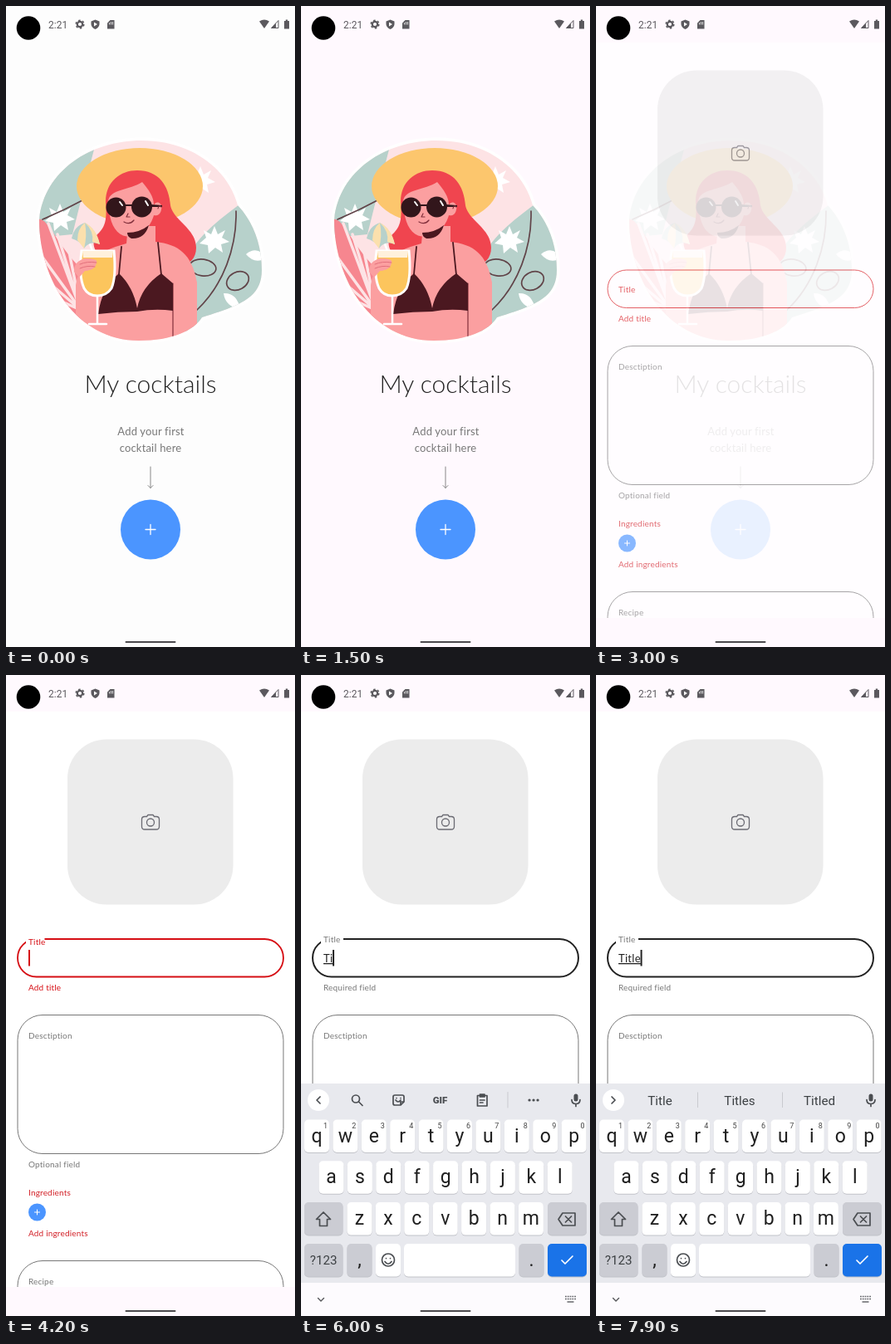
An HTML page for the animation above (8 s loop, 348x772 px).

```html
<!DOCTYPE html>
<html lang="en">
<head>
<meta charset="utf-8">
<title>My cocktails</title>
<style>
  html, body { margin: 0; width: 100%; height: 100%; overflow: hidden; background: #fff9fe; }
  svg { display: block; width: 100vw; height: 100vh; }
  text { font: 10px Lato, sans-serif; letter-spacing: .18px; fill: #777; }
  .mid { text-anchor: middle; }
  .line { fill: none; stroke-linecap: round; stroke-linejoin: round; }
  .err { fill: #d21f26; }
  .box { fill: none; stroke: #777; }
  .hint { font-size: 13px; }
  #head { font-size: 30px; font-weight: 300; letter-spacing: 0; fill: #222; }
  #typed { font-size: 13px; letter-spacing: .3px; fill: #222; text-decoration: underline; }
  #kb text { font-family: Roboto, sans-serif; letter-spacing: 0; text-anchor: middle; fill: #1f1f1f; }
  #kb .key { font-size: 23px; }
  #kb .num { font-size: 9px; fill: #444; }
  #kb .word { font-size: 15.2px; fill: #3c4043; }
</style>
</head>
<body>
<svg viewBox="0 0 348 772" preserveAspectRatio="none">
  <defs>
    <path id="blob" d="M40 258C45 200 100 162 163 162C222 162 267 195 279 240C296 258 308 285 308 318C308 350 285 360 236 375C226 391 200 403 160 403C85 403 40 330 40 258Z"/>
    <clipPath id="inBlob"><use href="#blob"/></clipPath>
    <clipPath id="inForm"><path d="M0 44H348V737H0Z"/></clipPath>
    <path id="flower" d="M0-17L4-7L13-12L9-3L18 2L8 5L10 15L1 9L-7 16L-8 6L-18 4L-10-3L-13-12L-4-7Z" fill="#fff"/>
  </defs>
  <rect id="bg" width="348" height="772"/>

  <g id="home">
    <use href="#blob" fill="#fff" stroke="#fff" stroke-width="7"/>
    <g clip-path="url(#inBlob)">
      <path d="M30 150H320V410H30Z" fill="#fde3e5"/>
      <path d="M30 280V150H112L95 215L80 275ZM222 296C240 268 262 254 285 236L320 270V400H215Z" fill="#b7d1cb"/>
      <path d="M36 258C50 250 58 285 92 318V385H36Z" fill="#f6868f"/>
      <path class="line" stroke="#fde3e5" stroke-width="3.5" d="M90 366L51 262M90 366L62 275M90 366L76 296M90 366L42 300M90 366L48 330M90 366L58 352"/>
      <use href="#flower" x="65" y="255"/>
      <use href="#flower" x="251" y="282"/>
      <use href="#flower" x="234" y="210"/>
      <path d="M289 299Q302 288 314 303Q300 312 289 299ZM262 346Q278 345 282 365Q264 362 262 346Z" fill="#fff"/>
      <g class="line" stroke="#614449" stroke-width="1.7">
        <path d="M277 247C278 290 262 336 230 366M44 257Q70 246 94 233"/>
        <ellipse cx="237" cy="315" rx="16" ry="10" transform="rotate(8 237 315)"/>
        <ellipse cx="279" cy="331" rx="14" ry="10.5" transform="rotate(-28 279 331)"/>
      </g>
      <ellipse cx="161" cy="217" rx="76" ry="46" fill="#fcc66d"/>
      <path d="M120 236C120 211 138 198 158 198C184 198 196 216 198 240C201 258 229 268 229 291C229 305 220 313 206 312H130C112 306 98 288 110 275C119 267 122 258 120 236Z" fill="#f0454f"/>
      <path d="M84 410V336C88 312 108 296 145 286L147 265H180V284C208 287 224 299 230 333V410Z" fill="#fb9fa0"/>
      <path d="M123 235C125 220 149 222 164 212C172 222 178 229 178 240C181 233 189 237 187 245C186 252 181 253 178 252C174 267 162 277 150 278C132 278 124 262 123 235Z" fill="#fb9fa0"/>
      <path d="M146 273Q161 273 172 264Q167 281 151 280Q146 278 146 273Z" fill="#4b171f"/>
      <g fill="#32161b">
        <circle cx="132.500" cy="242.500" r="12"/><circle cx="163.500" cy="242" r="12.500"/>
        <path d="M144 239H152V241H144ZM174 239L188 240V242H174Z"/>
      </g>
      <path class="line" stroke="#fff" stroke-width="2" d="M137 236L140 240M168 235L171 240"/>
      <path class="line" stroke="#812f3b" stroke-width="1.200" d="M147 250L145 254H149M142 260Q149 264 154 258M201 334V398M183 244Q184 239 187 242"/>
      <path class="line" stroke="#4b1820" stroke-width="1.800" d="M183 285L187 324M139 290L136 323"/>
      <path d="M111 371Q115 340 136 322Q153 338 158 364Q163 338 187 322L201 334V367Q179 364 158 368Q135 368 111 371Z" fill="#4b1820"/>
      <path class="line" stroke="#fff" stroke-width="2.500" d="M110 347V382M100 383H121M105 298L96 272"/>
      <path d="M79 280Q82 265 95 261Q108 268 113 287Q101 282 94 292Q90 283 79 280Z" fill="#b7d1cb"/>
      <path d="M95 261Q86 268 86 282L94 292Q98 277 95 261ZM95 261Q106 271 104 284L113 287Q109 268 95 261Z" fill="#fbe0ad"/>
      <path d="M91 295H130Q133 326 127 340Q121 349 110 349Q99 349 94 340Q87 324 91 295Z" fill="#fcc55d" stroke="#fff" stroke-width="3"/>
      <path d="M92 295H129L128 303H93Z" fill="#fff1dc"/>
      <path d="M82 320Q82 307 95 304Q111 304 109 309Q108 318 95 319L88 327Z" fill="#fb9fa0"/>
      <path class="line" stroke="#e2717c" d="M89 311Q98 307 109 309M89 316Q98 312 107 314"/>
    </g>
    <text id="head" class="mid" x="174" y="466">My cocktails</text>
    <text class="mid hint" x="174.500" y="517">Add your first</text>
    <text class="mid hint" x="174" y="537">cocktail here</text>
    <path class="line" stroke="#888" d="M174 555V580.500M171 577.500L174 580.500L177 577.500"/>
    <circle cx="174" cy="630.500" r="36" fill="#4b95ff"/>
    <path class="line" stroke="#fff" stroke-width="1.300" d="M168 630.500H180M174 624.500V636.500"/>
  </g>

  <g id="form" clip-path="url(#inForm)">
    <path d="M0 44H348V737H0Z" fill="#fff"/>
    <rect x="74" y="77.500" width="199.500" height="199" rx="47" fill="#ececec"/>
    <g class="line" stroke="#6b6b73" stroke-width="1.300">
      <path d="M167 170.500H169.500L171 168.500H177L178.500 170.500H181Q184.500 170.500 184.500 174V182.500Q184.500 186 181 186H167Q163.500 186 163.500 182.500V174Q163.500 170.500 167 170.500Z"/>
      <circle cx="174" cy="177.500" r="4.500"/>
    </g>
    <rect id="field" x="14" y="318" width="320" height="45.500" rx="22.700" fill="none"/>
    <rect id="notch" x="24" y="315" height="10" fill="#fff"/>
    <text id="label" x="27">Title</text>
    <text id="typed" x="27" y="346"></text>
    <rect id="caret" y="331" width="2" height="19.500"/>
    <text id="help" x="27" y="379.500"></text>
    <rect class="box" x="14" y="409.500" width="320" height="167" rx="30"/>
    <text x="27" y="437.500">Desctiption</text>
    <text x="27" y="592.500">Optional field</text>
    <text class="err" x="27" y="627">Ingredients</text>
    <circle cx="37.500" cy="647" r="10.500" fill="#4b95ff"/>
    <path class="line" stroke="#fff" d="M34.500 647H40.500M37.500 644V650"/>
    <text class="err" x="27" y="675.500">Add ingredients</text>
    <rect class="box" x="14" y="705.500" width="320" height="167" rx="30"/>
    <text x="27" y="733.500">Recipe</text>
  </g>

  <g id="kb">
    <path d="M0 492H348V733H0Z" fill="#e8e9ee"/>
    <path d="M0 732H348V772H0Z" fill="#fdfbfe"/>
    <g id="keys"></g>
    <circle cx="21" cy="512" r="13" fill="#fff"/>
    <g class="line" stroke="#4a4d51" stroke-width="1.700">
      <path id="arrow"/>
      <g id="tools">
        <circle cx="66" cy="510.500" r="4.500"/><path d="M69.500 514L74 518.500"/>
        <path d="M113 506H122Q124 506 124 508V514L120 518H113Q111 518 111 516V508Q111 506 113 506ZM124 514H120V518M114 512Q117 516 120 512M115 509.500V509.600M120 509.500V509.600"/>
        <path d="M212.500 506.500H224V519H212.500ZM215.500 505H221V508H215.500ZM215.500 512H221M215.500 515H219"/>
        <path d="M249 502.500V521" stroke="#c9cacf" stroke-width="1"/>
        <path d="M275 512H275.100M280 512H280.100M285 512H285.100" stroke-width="3.200"/>
        <text x="167.500" y="516" style="font-size:11.500px;font-weight:900;fill:#4a4d51" stroke="none">GIF</text>
      </g>
      <path d="M331 507V511" stroke-width="5"/><path d="M326 511.500Q326 516.500 331 516.500Q336 516.500 336 511.500M331 517V519.500"/>
      <path d="M27 647L18.500 655.500H22.500V663.500H31.500V655.500H35.500Z"/>
      <path d="M315 648H330V663H315L310 655.500ZM318.500 652L325.500 659M325.500 652L318.500 659"/>
      <circle cx="105" cy="704.500" r="7.500"/><path d="M101 706.500Q105 712 109 706.500M102.500 702.500V702.600M107.500 702.500V702.600"/>
      <path d="M314 705L318 709L327 700" stroke="#fff"/>
    </g>
    <g id="words">
      <text class="word" x="77" y="517.500">Title</text>
      <text class="word" x="173" y="517.500">Titles</text>
      <text class="word" x="269" y="517.500">Titled</text>
      <path d="M122.500 502.500V521M224.500 502.500V521" stroke="#c9cacf"/>
    </g>
  </g>

  <g id="nav">
    <path class="line" stroke="#55565a" stroke-width="1.400" d="M20.500 750.500L24 754L27.500 750.500"/>
    <path d="M318 748.500H331M318 751.500H331" stroke="#66676b" stroke-width="1.600" stroke-dasharray="1.800 1"/>
    <path d="M320.500 755H328.500" stroke="#66676b" stroke-width="1.500"/>
  </g>
  <path class="line" stroke="#4b494d" stroke-width="2" d="M144.500 766H203.500"/>

  <g fill="#5b595e">
    <circle cx="27" cy="26.500" r="14.300" fill="#000"/>
    <text x="51" y="26.500" style="font:12px Roboto,sans-serif;letter-spacing:0;fill:#5b595e">2:21</text>
    <circle cx="89" cy="22" r="3.200" fill="none" stroke="#5b595e" stroke-width="2.200"/>
    <circle cx="89" cy="22" r="4.800" fill="none" stroke="#5b595e" stroke-width="1.500" stroke-dasharray="2.500 2.527"/>
    <path d="M107.500 16.500L112.500 18.500V22Q112 26 107.500 28Q103 26 102.500 22V18.500Z"/>
    <path d="M106 19.500V24.500L110 22Z" fill="#fff"/>
    <path d="M125.500 17H130.500V27.500H122V20.500Z"/>
    <path d="M124.500 20V22.500M126.500 19V22.500M128.500 19V22.500" stroke="#fff" stroke-width=".8"/>
    <path d="M305 18.500Q311 14.500 317 18.500L311 27Z"/>
    <path d="M319.500 26.500L328 17.500V26.500Z" fill="none" stroke="#5b595e"/><path d="M319.500 26.500L325 20.500V26.500Z"/>
    <path d="M335 18H336.800V16.500H339.200V18H341V27.500H335Z"/>
  </g>
</svg>
<script>
const LOOP = 8000;
const RED = [214, 14, 20], DARK = [34, 34, 34], GREY = [119, 119, 119];
const $ = id => document.getElementById(id);
const set = (id, attrs) => { for (const k in attrs) $(id).setAttribute(k, attrs[k]); };
const show = (id, on) => set(id, { visibility: on ? 'visible' : 'hidden' });
const ramp = (t, start, length) => Math.min(1, Math.max(0, (t - start) / length));
const ease = p => p * p * (3 - 2 * p);
const mix = (a, b, p) => `rgb(${a.map((v, i) => Math.round(v + (b[i] - v) * p))})`;

function key(x, y, w, label = '', fill = '#fff', cls = 'key') {
  return `<rect x="${x}" y="${y + 1}" width="${w}" height="39.5" rx="5" fill="#c2c3c9"/>` +
    `<rect x="${x}" y="${y}" width="${w}" height="39.5" rx="5" fill="${fill}"/>` +
    `<text class="${cls}" x="${x + w / 2}" y="${y + (cls === 'key' ? 27 : 25)}">${label}</text>`;
}

function buildKeys() {
  const pitch = 34.4, side = '#cbccd3';
  let out = '';
  [['qwertyuiop', 4], ['asdfghjkl', 21.5], ['zxcvbnm', 55.5]].forEach(([row, left], r) => {
    [...row].forEach((ch, i) => {
      const x = left + i * pitch;
      out += key(x, 535.5 + r * 49.8, 30, ch);
      if (!r) out += `<text class="num" x="${x + 25.5}" y="546">${(i + 1) % 10}</text>`;
    });
  });
  out += key(4, 635, 46.5, '', side) + key(297, 635, 47, '', side);
  out += key(4, 685, 46.5, '?123', side, 'word') + key(55.5, 685, 30, ',', side);
  out += key(90, 685, 30) + key(124, 685, 134) + key(262.5, 685, 30, '.', side);
  out += key(297, 685, 47, '', '#1a73e8');
  $('keys').innerHTML = out;
}

const strokes = [5700, 5900, 6300, 6400, 6500];

function draw(t) {
  set('bg', { fill: mix([253, 253, 253], [255, 249, 254], ramp(t, 0, 1000)) });

  const swap = ease(ramp(t, 2640, 600));
  set('home', { opacity: 1 - swap });
  set('form', { opacity: swap });

  // Title field: focus, then error clears on the first letter
  const focus = ease(ramp(t, 4090, 150));
  const valid = ramp(t, 5700, 150);
  const count = strokes.filter(s => t >= s).length;
  set('field', { stroke: mix(RED, DARK, valid), 'stroke-width': 1 + focus });
  set('notch', { width: 27 * focus });
  set('label', { y: 344.5 - 23 * focus, fill: mix(RED, GREY, valid) });
  $('label').style.fill = mix(RED, GREY, valid);
  $('help').textContent = count ? 'Required field' : 'Add title';
  $('help').style.fill = mix(RED, GREY, valid);

  $('typed').textContent = 'Title'.slice(0, count);
  $('typed').style.textDecoration = count < 5 || t >= 6700 ? 'underline' : 'none';
  const since = t - (count ? strokes[count - 1] : 4100);
  show('caret', since >= 0 && since % 1000 < 500);
  set('caret', {
    x: 27 + (count ? $('typed').getComputedTextLength() - .3 : 0),
    fill: mix(RED, DARK, valid)
  });

  // Keyboard
  const rise = 1 - (1 - ramp(t, 4500, 300)) ** 3;
  set('kb', { transform: `translate(0 ${280 * (1 - rise)})` });
  show('kb', rise > 0);
  show('nav', t >= 4300);
  const suggest = t >= 6700;
  show('tools', rise > 0 && !suggest);
  show('words', suggest);
  set('arrow', { d: suggest ? 'M19 508L23 512L19 516' : 'M23 508L19 512L23 516' });
}

buildKeys();
(function frame() {
  draw(performance.now() % LOOP);
  requestAnimationFrame(frame);
})();
</script>
</body>
</html>
```
